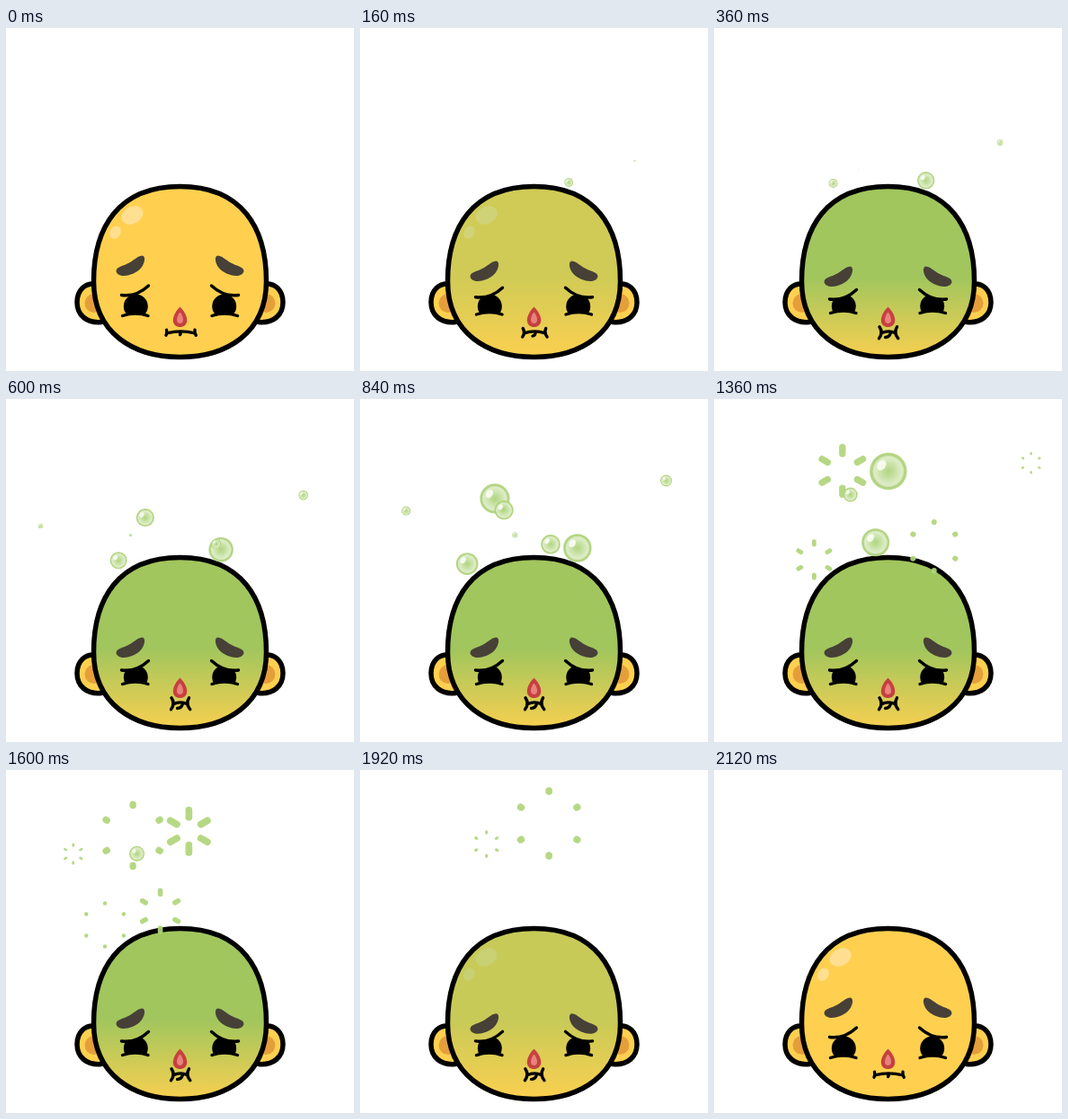
These frames come from a looping animation (387x382 px, 2160 ms). An HTML page with a canvas:

```html
<!DOCTYPE html>
<html lang="en">
<head>
<meta charset="utf-8">
<title>Queasy face</title>
<style>
html, body { margin: 0; width: 100%; height: 100%; overflow: hidden; background: #fff; }
canvas { display: block; width: 387px; height: 382px; }
</style>
</head>
<body>
<canvas id="stage"></canvas>
<script>
const W = 387, H = 382, LOOP = 2160, STEP = 40, MID = 193.5;
const DRIFT = 1520, BURST = 520;
const canvas = document.getElementById('stage');
const ctx = canvas.getContext('2d');
const dpr = window.devicePixelRatio || 1;
canvas.width = W * dpr;
canvas.height = H * dpr;

const clamp = v => Math.max(0, Math.min(1, v));
const lerp = (a, b, k) => a + (b - a) * k;
const ramp = (t, a, b) => clamp((t - a) / (b - a));
const ease = k => k * k * (3 - 2 * k);
const easeOut = k => 1 - (1 - k) * (1 - k);

// A bubble slows down on its way between two points, grows to `size`, then pops.
const bubbles = [
  { born: 80, pop: 1040, size: 6.8, from: [300, 157], to: [354, 69] },
  { born: 0, pop: 960, size: 16, from: [229, 174], to: [245, 164] },
  { born: 350, pop: 1220, size: 20.5, from: [161, 159], to: [140.5, 70] },
  { born: 560, pop: 1520, size: 21.3, from: [134.5, 156.5], to: [211, 58.5] },
  { born: 400, pop: 1360, size: 7.2, from: [26, 158], to: [77, 90.5] },
  { born: 650, pop: 1601, size: 8.5, from: [182.5, 173.5], to: [139.5, 80] },
  { born: 410, pop: 1370, size: 15.5, from: [254, 161], to: [167.5, 153], sag: 6 },
  { born: 160, pop: 1120, size: 13.5, from: [140, 166], to: [110, 170], sag: 15 }
];

function fill(path, color) {
  ctx.fillStyle = color;
  ctx.fill(new Path2D(path));
}
function line(path, width) {
  ctx.lineWidth = width;
  ctx.strokeStyle = '#000';
  ctx.stroke(new Path2D(path));
}
function oval(x, y, rx, ry, angle, color) {
  ctx.beginPath();
  ctx.ellipse(x, y, rx, ry, angle, 0, Math.PI * 2);
  ctx.fillStyle = color;
  ctx.fill();
}
function bothSides(draw) {
  draw();
  ctx.save();
  ctx.translate(MID * 2, 0);
  ctx.scale(-1, 1);
  draw();
  ctx.restore();
}

const headPath = 'M193.5 176.5C262 176.5 289.5 222 289.5 282C289.5 340 245 366.5 193.5 366.5' +
  'C142 366.5 97.5 340 97.5 282C97.5 222 125 176.5 193.5 176.5Z';
const earPath = 'M101 285.5C88 283 79 292 79 305.5C79 320 90 329 106 327.5';
const browPath = 'M122.5 271C122.5 265.5 130 265.5 137 261.5C143 258 147 253.5 152 253.5' +
  'C156 255 154 264 148.5 269C141 276 125 279.5 122.5 271Z';

function ear() {
  fill(earPath, '#ffd04f');
  oval(98, 306.5, 10.5, 10.5, 0, '#e59f3a');
  line(earPath, 5.5);
}

function eye(m) {
  const y = lerp(0, 4.5, m), low = lerp(320.5, 317.5, m);
  const lid = `M128.5 ${297.5 + y}C140 ${299 + y} 150 ${295 + y} 158.5 ${287 + y}`;
  ctx.save();
  ctx.clip(new Path2D(`${lid}L166 300L160 ${low}Q144 ${low - 4} 129 ${low}Z`));
  oval(144.3, 310, 13.5, 13.5, 0, '#000');
  ctx.restore();
  line(lid, 3.4);
  line(`M129.5 ${low}Q144 ${low - 5} 158 ${low}`, 3.4);
}

function mouth(m) {
  const l = lerp(178.5, 184, m), r = lerp(210.5, 204, m), h = lerp(3, 6.5, m);
  const bend = lerp(1, 4.5, m), y = 339.3;
  line(`M${l} ${y - h}Q${l + bend} ${y} ${l - .5} ${y + h}`, 3.4);
  line(`M${r - .5} ${y - h}Q${r - bend} ${y} ${r + .8} ${y + h}`, 3.4);
  line(`M${l + bend / 2} ${y + .5}Q194 ${y - 3.3} ${r - bend / 2} ${y + .5}`, 3.4);
  line(`M${lerp(193.5, 196.5, m)} 339.5Q195 ${lerp(340, 344.5, m)} ${lerp(193.5, 190.5, m)} ${lerp(341.5, 344.5, m)}`, 3.3);
}

function face(t) {
  const m = ease(ramp(t, 0, 320)) * (1 - ease(ramp(t, 1900, 2110)));
  const green = ease(ramp(t, 0, 320)) * (1 - Math.pow(ramp(t, 1720, 2120), 1.3));
  const dip = ease(ramp(t, 1680, 1920)) - ease(ramp(t, 1920, 2100));

  bothSides(ear);
  fill(headPath, '#ffd04f');
  oval(140.5, 208.5, 12.5, 9.5, -.5, '#ffdf91');
  oval(121.5, 227.7, 5.8, 7.5, .5, '#ffdf91');
  const tint = ctx.createLinearGradient(0, 278, 0, 367);
  tint.addColorStop(0, 'rgba(161,198,93,1)');
  tint.addColorStop(1, 'rgba(161,198,93,.08)');
  ctx.globalAlpha = green;
  fill(headPath, tint);
  ctx.globalAlpha = 1;
  line(headPath, 5.5);

  bothSides(() => {
    ctx.save();
    ctx.translate(0, 12 * m + 6 * dip);
    fill(browPath, '#464037');
    ctx.restore();
    eye(m);
  });
  mouth(m);
  fill('M193.5 310.5C197 314 201.3 320 201.3 325.5C201.3 330.5 197.5 333 193.5 333' +
    'C189.5 333 185.8 330.5 185.8 325.5C185.8 320 190 314 193.5 310.5Z', '#c5413f');
  fill('M193.5 316.5C195.5 318.5 197 322 197 325C197 327.8 195.5 329 193.5 329' +
    'C191.5 329 190 327.8 190 325C190 322 191.5 318.5 193.5 316.5Z', '#e8827e');
}

function ball(x, y, r) {
  const g = ctx.createRadialGradient(x, y, 0, x, y, r);
  g.addColorStop(0, '#abd276');
  g.addColorStop(.3, '#bddc94');
  g.addColorStop(.72, '#dbebc3');
  g.addColorStop(.82, '#cfe4b0');
  g.addColorStop(.86, '#abd075');
  g.addColorStop(1, '#b2d480');
  oval(x, y, r, r, 0, g);
  oval(x - r * .36, y - r * .32, r * .22, r * .3, .6, 'rgba(255,255,255,.85)');
}

function burst(x, y, r, p) {
  const mid = r * (.65 + 1.15 * (1 - Math.pow(1 - p, 1.6)));
  const wide = r * .36 * clamp((1 - p) * 12);
  const half = Math.max(0, r * .78 * clamp(p * 8) * (1 - .75 * Math.pow(p, 1.6)) - wide) / 2;
  if (wide < .1) return;
  ctx.lineWidth = wide;
  ctx.strokeStyle = '#b1d57b';
  ctx.beginPath();
  for (let i = 0; i < 6; i++) {
    const a = Math.PI * (i / 3 - .5), c = Math.cos(a), s = Math.sin(a);
    ctx.moveTo(x + c * (mid - half), y + s * (mid - half));
    ctx.lineTo(x + c * (mid + half + .01), y + s * (mid + half + .01));
  }
  ctx.stroke();
}

function bubble({ born, pop, size, from, to, sag = 0 }, t) {
  const p = (t - pop) / BURST;
  if (t <= born || p >= 1) return;
  const v = clamp((t - born) / DRIFT), k = easeOut(v);
  const x = lerp(from[0], to[0], k);
  const y = lerp(from[1], to[1], k) + sag * Math.sin(Math.PI * v);
  ctx.globalAlpha = .93;
  if (p < 0) ball(x, y, size * easeOut(ramp(t, born, pop)));
  else if (p > 0) burst(x, y, size, p);
  ctx.globalAlpha = 1;
}

function draw(t) {
  ctx.setTransform(dpr, 0, 0, dpr, 0, 0);
  ctx.fillStyle = '#fff';
  ctx.fillRect(0, 0, W, H);
  ctx.lineCap = ctx.lineJoin = 'round';
  face(t);
  bubbles.forEach(b => bubble(b, t));
}

const start = performance.now();
function tick() {
  const t = (performance.now() - start) % LOOP;
  draw(Math.floor(t / STEP) * STEP);
  requestAnimationFrame(tick);
}
tick();
</script>
</body>
</html>
```
